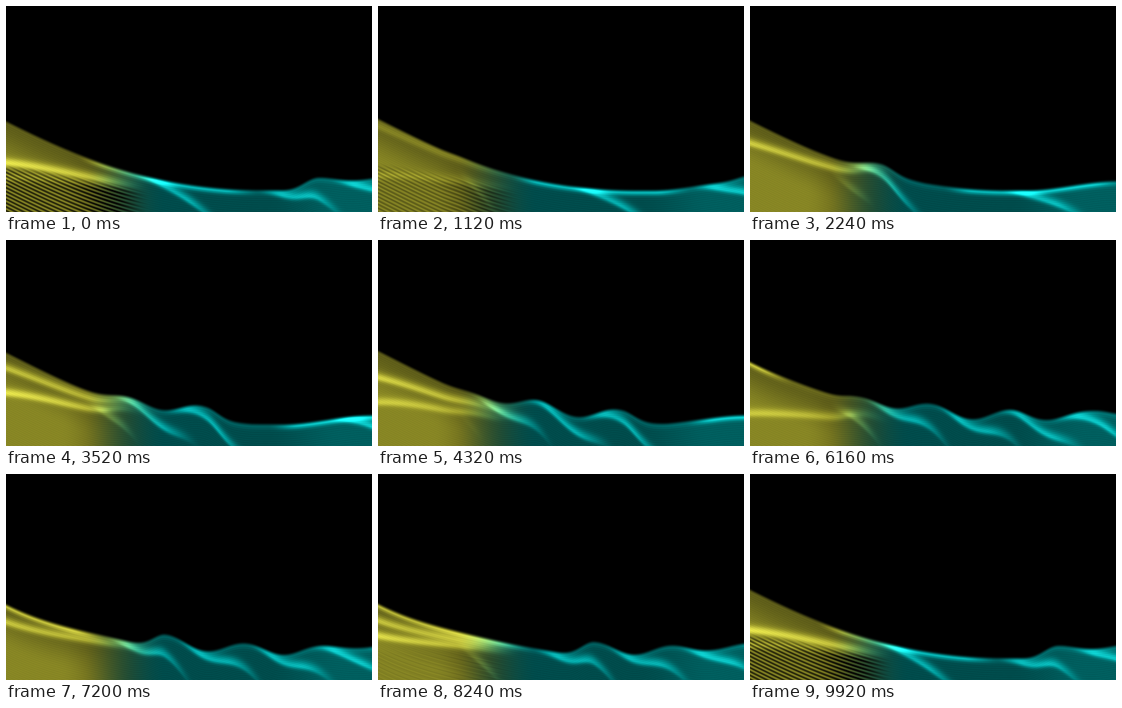
These frames come from a looping animation (480x270 px, 10000 ms). An HTML page with a canvas:

```html
<!DOCTYPE html>
<html lang="en">
<head>
<meta charset="utf-8">
<title>Flowing wave</title>
<style>
  html, body { margin: 0; height: 100%; overflow: hidden; background: #000; }
  canvas { display: block; width: 480px; height: 270px; }
</style>
</head>
<body>
<canvas id="stage" width="480" height="270"></canvas>
<script>
const W = 480, H = 270, TOP = 130;
const LOOP = 10, STEP = 0.08;           // seconds
const PERIOD = 720, SPEED = PERIOD / LOOP; // the pattern drifts right once per loop
const FOLDS = [-405, -310, -215, -135, -60, 155]; // where folds leave the crest, in drifting space
const BIRTHS = [0.6, 2.4, 5.9, 7];      // when folds start sinking down the left slope
const SINK = 18;                        // px per second

const ctx = document.getElementById('stage').getContext('2d');
const image = ctx.createImageData(W, H - TOP);

const mod = (v, n) => (v % n + n) % n;
const mix = (a, b, w) => a + (b - a) * w;
const smooth = v => { v = Math.min(1, Math.max(0, v)); return v * v * (3 - 2 * v); };
const pulse = (v, from, rise, to, fall) => smooth((v - from) / rise) * smooth((to - v) / fall);
const turn = (t, peak, times) => Math.cos(2 * Math.PI * times * (t - peak) / LOOP);
const drift = (x, t) => mod(x - SPEED * t + 380, PERIOD) - 380;

function crestAt(x, t) {
  const slope = 241 - 86 * Math.max(0, 1 - x / 340) ** 2 - 12 * smooth((x - 360) / 120);
  const swing = (11 * turn(t, 7.8, 1) + 6 * turn(t, 2.6, 2)) * Math.exp(-((x / 110) ** 2));
  const u = drift(x, t);
  const packet = pulse(u, -360, 50, 70, 60) * smooth((x - 80) / 140) * (1 - 0.6 * smooth((x - 340) / 120));
  return slope + swing - packet * (12 + 7 * Math.cos(2 * Math.PI * u / 103));
}

// Bright bands in one column, as depths below the crest
function bandsAt(x, t) {
  const u = drift(x, t);
  const bands = [{ depth: 3, above: 3, below: 4,
                   light: 0.1 * smooth((x - 120) / 80) + 0.42 * pulse(u, 90, 40, 335, 50) }];
  for (const start of FOLDS) {
    const d = x - (mod(start + SPEED * t + 240, PERIOD) - 240);
    const light = 0.5 * pulse(d, 10, 40, 140, 60) * smooth((x - 100) / 60);
    if (light) bands.push({ depth: d * d / 330, above: 8, below: 4, light });
  }
  for (const birth of BIRTHS) {
    const sunk = SINK * mod(t - birth, LOOP);
    const light = 0.42 * pulse(sunk, 0, 20, 88, 32) * smooth((190 - x) / 70);
    if (light) bands.push({ depth: sunk * Math.exp(-x / 130), above: 7, below: 5, light });
  }
  return bands;
}

function draw(t) {
  const data = image.data;
  const hollow = Math.max(0, turn(t, 0, 1)) ** 3;
  data.fill(0);
  for (let x = 0; x < W; x++) {
    const crest = crestAt(x, t), bands = bandsAt(x, t);
    const hue = smooth((x - 100) / 110);
    const left = smooth((170 - x) / 100);
    const right = mix(0.4, 0.5, smooth((x - 340) / 100));
    const rings = hollow * smooth((190 - x) / 60);
    for (let y = Math.max(TOP, Math.floor(crest) - 3); y < H; y++) {
      const depth = y - crest;
      let light = mix(right, 0.5 + 0.22 * smooth(depth / 60), left) + 0.02 * Math.sin(depth * 2.2);
      light -= rings * 0.27 * smooth((depth - 56 * Math.exp(-x / 130)) / 12) * (1 + Math.sin(depth * 1.25));
      for (const band of bands) {
        const reach = (depth - band.depth) / (depth < band.depth ? band.above : band.below);
        light += band.light * Math.exp(-reach * reach);
      }
      light = Math.max(0.04, light) * smooth((depth + 3) / 6);
      const glow = Math.max(0, light - 0.8) * 60;
      const k = ((y - TOP) * W + x) * 4;
      data[k] = mix(188, 0, hue) * light + glow;
      data[k + 1] = mix(186, 188, hue) * light + glow;
      data[k + 2] = mix(50, 188, hue) * light + glow;
      data[k + 3] = 255;
    }
  }
  ctx.putImageData(image, 0, TOP);
}

const start = performance.now();
let shown = -1;
function tick() {
  const frame = Math.floor((performance.now() - start) / 1000 % LOOP / STEP);
  if (frame !== shown) draw((shown = frame) * STEP);
  requestAnimationFrame(tick);
}
tick();
</script>
</body>
</html>
```
